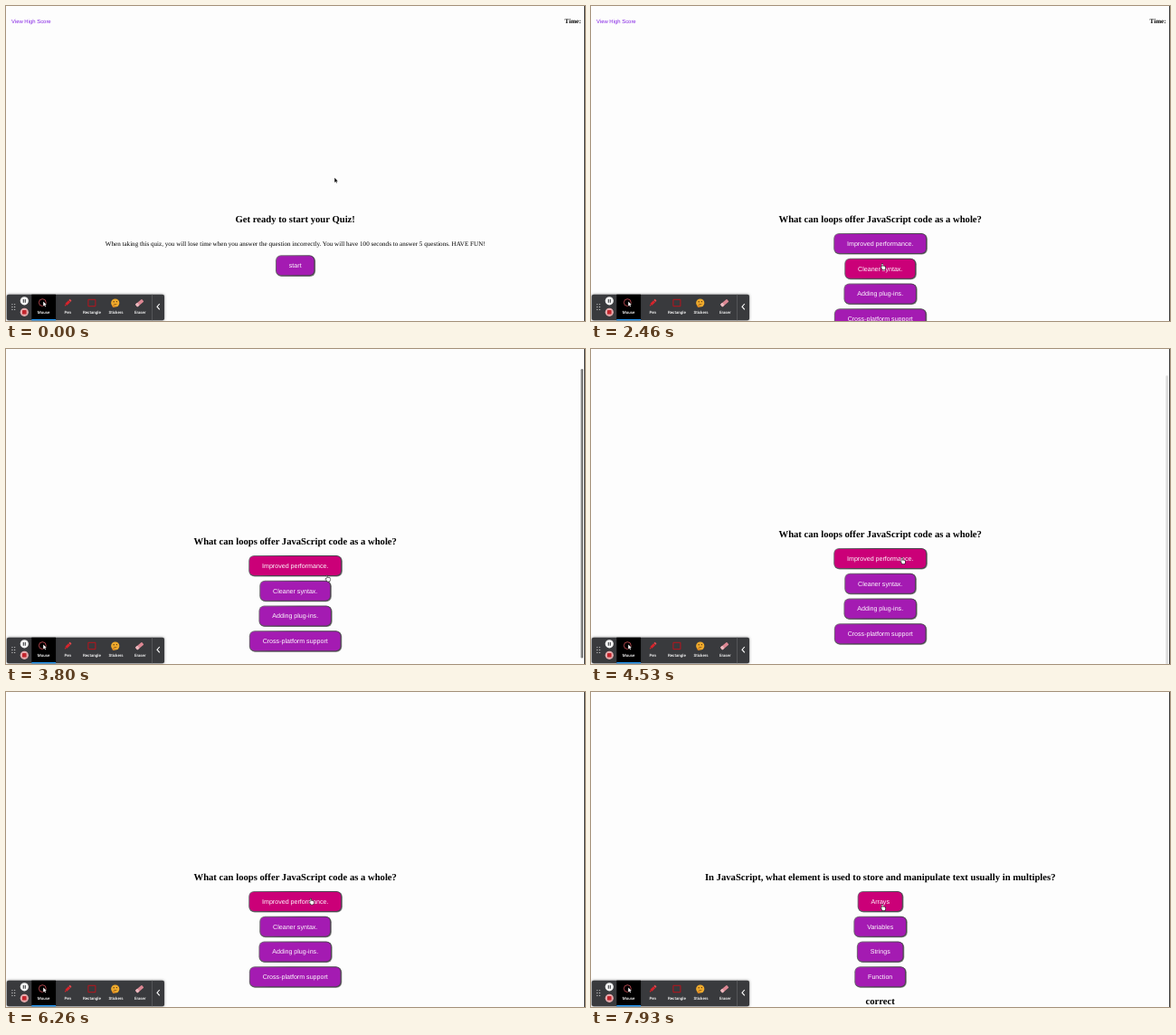
Recreate the animation shown at these times as an HTML page with a canvas. Size 640 by 348 pixels, loop 8 s.

```html
<!DOCTYPE html>
<html lang="en">
<head>
<meta charset="utf-8">
<title>Quiz</title>
<style>
  html, body { margin: 0; width: 100%; height: 100%; overflow: hidden; background: #fdfdfd; }
  canvas { display: block; width: 640px; height: 348px; }
</style>
</head>
<body>
<canvas id="stage"></canvas>
<script>
const W = 640, H = 348, LOOP = 8000, MID = 319.7;
const SERIF = '"Liberation Serif", serif';
const SANS = '"Liberation Sans", sans-serif';
const BUTTON_H = 23, BUTTON_GAP = 27.75, SCROLL = 31;
const MOVE = 300;   // duration of one pointer move
const LAG = 130;    // highlight trails the pointer
const canvas = document.getElementById('stage');
const ctx = canvas.getContext('2d');
const ratio = window.devicePixelRatio || 1;
canvas.width = W * ratio;
canvas.height = H * ratio;

const pages = [
  { from: 0, title: 'Get ready to start your Quiz!', top: 286.8, buttons: ['start'],
    note: 'When taking this quiz, you will lose time when you answer the question incorrectly. ' +
          'You will have 100 seconds to answer 5 questions. HAVE FUN!' },
  { from: 2330, title: 'What can loops offer JavaScript code as a whole?', top: 262.4,
    buttons: ['Improved performance.', 'Cleaner syntax.', 'Adding plug-ins.', 'Cross-platform support'] },
  { from: 6400, title: 'In JavaScript, what element is used to store and manipulate text usually in multiples?',
    top: 262.4, buttons: ['Arrays', 'Variables', 'Strings', 'Function'], verdict: 'correct' }
];

// Where the fingertip heads, and when it sets off
const stops = [
  { from: 1400, x: 322, y: 284.6 },
  { from: 2900, x: 335.8, y: 268.6 },
  { from: 3350, x: 354.8, y: 250 },
  { from: 4130, x: 343.8, y: 230.6 },
  { from: 5000, x: 336.8, y: 228 },
  { from: 6700, x: 328, y: 257 },
  { from: 7500, x: 322, y: 234.6 }
];

const clamp = v => Math.max(0, Math.min(1, v));
const mix = (a, b, k) => a + (b - a) * k;
const smooth = u => u * u * (3 - 2 * u);
const scrollAt = t => Math.round(SCROLL * (1 - Math.exp(-Math.max(0, t - 3700) / 72)));

function pointerAt(t) {
  const i = Math.max(0, stops.findLastIndex(s => s.from <= t));
  const to = stops[i], from = stops[Math.max(0, i - 1)];
  const k = smooth(clamp((t - to.from) / MOVE));
  return { x: mix(from.x, to.x, k), y: mix(from.y, to.y, k) };
}

function text(str, x, y, font, color = '#000', align = 'center') {
  ctx.font = font;
  ctx.fillStyle = color;
  ctx.textAlign = align;
  ctx.fillText(str, x, y);
}

function rect(x, y, w, h, color, r = 0) {
  ctx.beginPath();
  ctx.roundRect(x, y, w, h, r);
  ctx.fillStyle = color;
  ctx.fill();
}

function disc(x, y, r, color) {
  ctx.beginPath();
  ctx.arc(x, y, r, 0, 2 * Math.PI);
  ctx.fillStyle = color;
  ctx.fill();
}

function outline(color, width) {
  ctx.strokeStyle = color;
  ctx.lineWidth = width;
  ctx.stroke();
}

// Runs draw in a frame moved to x, y and turned by angle
function at(x, y, angle, draw) {
  ctx.save();
  ctx.translate(x, y);
  ctx.rotate(angle);
  draw();
  ctx.restore();
}

function button(label, y, tip) {
  const font = '7.1px ' + SANS;
  ctx.font = font;
  const w = ctx.measureText(label).width + 29.6, h = BUTTON_H;
  const x = MID - w / 2, top = y - h / 2;
  const hot = tip && Math.abs(tip.x - MID) < w / 2 && Math.abs(tip.y - y) < h / 2 + 1;
  const edge = ctx.createLinearGradient(x, top, x + h, top + h);
  edge.addColorStop(0, '#7b727d');
  edge.addColorStop(1, '#4b434e');
  rect(x + 0.7, top + 0.7, w, h, 'rgba(0,0,0,0.5)', 6);
  rect(x, top, w, h, edge, 6);
  rect(x + 1, top + 1, w - 2, h - 2, hot ? '#cb0078' : '#a41bb2', 5);
  text(label, MID, y + 2.4, font, '#fff');
}

function drawPage(t) {
  const page = pages.findLast(p => p.from <= t);
  const scroll = scrollAt(t);
  const heading = 'bold 10.65px ' + SERIF;
  let tip = null;
  if (t >= stops[0].from) {
    tip = pointerAt(t - LAG);
    tip.y += scroll;
  }
  ctx.save();
  ctx.translate(0, -scroll);
  text('View High Score', 6, 19.2, '5.93px ' + SANS, '#8423e4', 'left');
  text('Time:', 635.6, 19.4, 'bold 7.1px ' + SERIF, '#000', 'right');
  text(page.title, MID, 239.4, heading);
  if (page.note) text(page.note, MID, 264.5, '7.1px ' + SERIF);
  page.buttons.forEach((label, i) => button(label, page.top + i * BUTTON_GAP, tip));
  if (page.verdict) text(page.verdict, MID, 376.2, heading);
  ctx.restore();

  if (scroll > 0) {
    const track = H / (H + SCROLL);
    ctx.globalAlpha = 1 - clamp((t - 4330) / 270);
    rect(635.4, scroll * track + 0.8, 2.6, H * track, '#7c7c7c', 1.3);
    ctx.globalAlpha = 1;
  }
  rect(639, 0, 1, H, '#3c3c3c');
}

function drawArrow(x, y, fill, edge) {
  at(x, y, 0, () => {
    ctx.beginPath();
    ctx.moveTo(0, 0);
    ctx.lineTo(0, 5.1);
    ctx.lineTo(1.2, 4);
    ctx.lineTo(2, 5.8);
    ctx.lineTo(2.8, 5.4);
    ctx.lineTo(2, 3.7);
    ctx.lineTo(3.6, 3.6);
    ctx.closePath();
    outline(edge, 0.9);
    ctx.fillStyle = fill;
    ctx.fill();
  });
}

// Dark silhouette first, then the same parts in white
function drawHand({ x, y }) {
  for (const [grow, color] of [[0.25, '#222'], [-0.25, '#fff']]) {
    const part = (dx, dy, w, h, r) =>
      rect(x + dx - grow, y + dy - grow, w + 2 * grow, h + 2 * grow, color, r);
    part(-0.6, 0, 1.3, 4, 0.6);
    part(-0.7, 2.6, 4.2, 4.3, 1.3);
    part(-1.8, 3.5, 2, 1.5, 0.7);
  }
}

// Each icon is drawn around its own centre
const tools = {
  Mouse() {
    ctx.beginPath();
    ctx.arc(-1.3, -0.4, 3.9, 0, 2 * Math.PI);
    outline('#d9555c', 0.8);
    drawArrow(-0.4, -1.6, '#fff', '#000');
  },
  Pen() {
    ctx.rotate(Math.PI / 4);
    rect(-1.4, -4.8, 2.8, 1.9, '#e0474c', 0.6);
    rect(-1.4, -2.5, 2.8, 5, '#d8232b');
    rect(-0.6, 2.5, 1.2, 2, '#d8232b', 0.6);
  },
  Rectangle() {
    ctx.beginPath();
    ctx.rect(-4, -3.7, 8, 7.4);
    outline('#b8141c', 1);
  },
  Stickers() {
    disc(-0.8, 0, 4.6, '#efaa2c');
    disc(-2.4, -1.2, 0.7, '#5b3713');
    disc(0.8, -1.4, 0.7, '#5b3713');
    rect(-2.3, 1.4, 3, 0.7, '#6b4014');
    disc(-2.5, 3.4, 1.5, '#dd8a24');
  },
  Eraser() {
    ctx.rotate(-Math.PI / 4.5);
    rect(-5.2, -2.2, 9.4, 3.8, '#dc8793', 0.8);
    rect(-5.2, -2.2, 3.2, 3.8, '#eab9bf', 0.8);
  }
};

function drawToolbar() {
  const top = 318.7, height = 28.5;
  ctx.save();
  ctx.shadowColor = 'rgba(0,0,0,0.5)';
  ctx.shadowBlur = 3 * ratio;
  rect(0.8, top, 174.2, height, '#393a3d', 2);
  ctx.restore();

  for (let i = 0; i < 6; i++) disc(6.9 + (i % 2) * 2.7, 329.6 + (i >> 1) * 2.9, 0.7, '#b9b9b9');
  disc(20.3, 325.8, 4.6, '#f4f4f4');
  rect(18.8, 323.9, 1, 3.8, '#35363a');
  rect(20.8, 323.9, 1, 3.8, '#35363a');
  disc(20.3, 338.3, 4.6, '#e3a9ab');
  rect(18, 336, 4.6, 4.6, '#c4262e', 0.7);

  rect(28.3, top, 26.8, height, '#000');
  rect(28.3, 346, 26.8, 1.4, '#2196f3');
  Object.entries(tools).forEach(([label, icon], i) => {
    const x = 41.6 + i * 26.65;
    at(x, 328, 0, icon);
    text(label, x, 339.8, '500 4.45px Roboto, sans-serif', '#fff');
  });
  rect(161.3, top, 0.7, height, '#606164');
  ctx.beginPath();
  ctx.moveTo(169.8, 329);
  ctx.lineTo(167, 332.2);
  ctx.lineTo(169.8, 335.4);
  outline('#fff', 1.1);
}

function render(t) {
  ctx.setTransform(ratio, 0, 0, ratio, 0, 0);
  ctx.textRendering = 'geometricPrecision';
  rect(0, 0, W, H, '#fdfdfd');
  drawPage(t);
  drawToolbar();
  if (t < stops[0].from) drawArrow(363.2, 189.8, '#111', '#fff');
  else drawHand(pointerAt(t));
}

const start = performance.now();
function tick() {
  render((performance.now() - start) % LOOP);
  requestAnimationFrame(tick);
}
tick();
</script>
</body>
</html>
```
